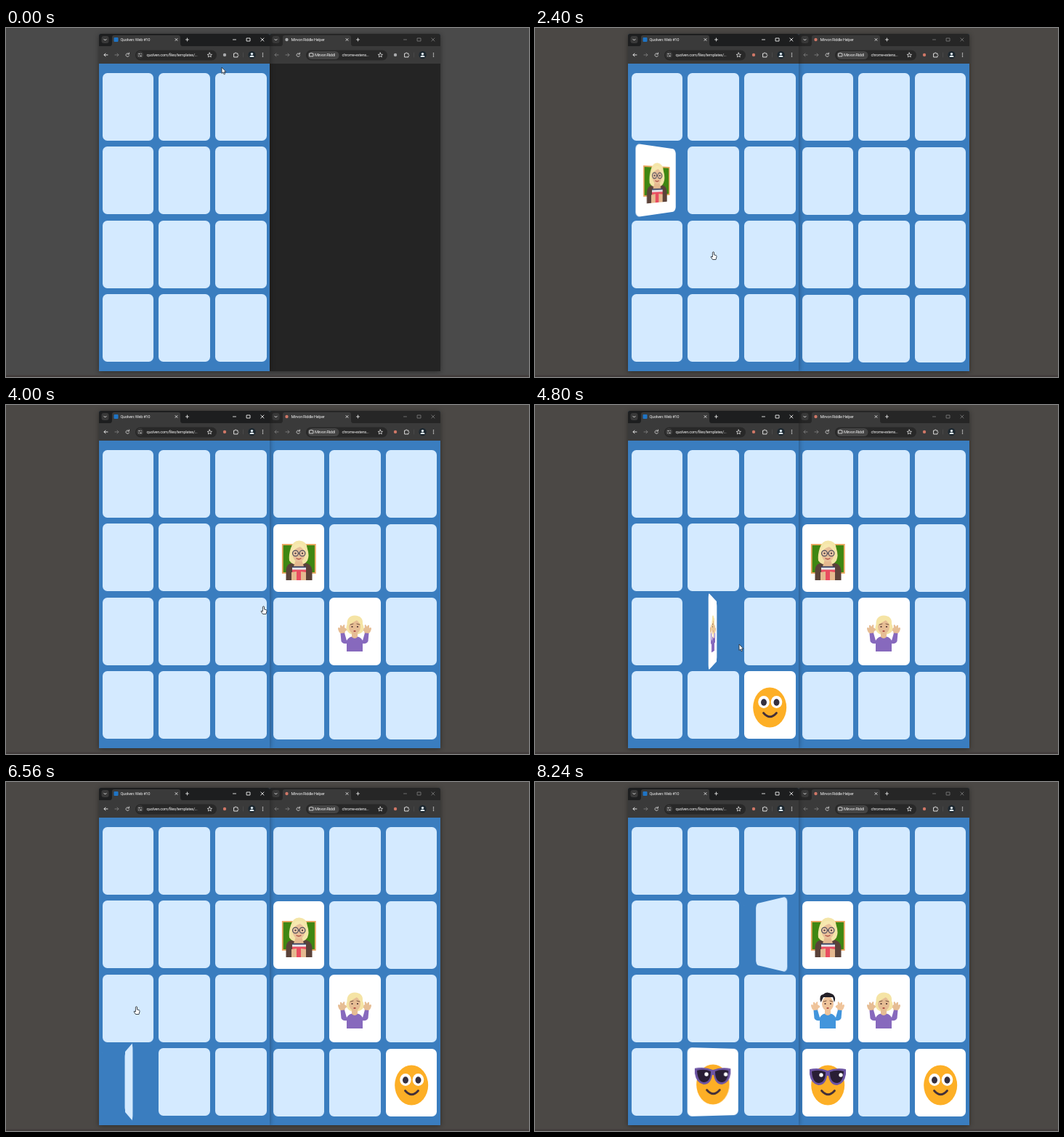
Write an HTML page that moves like this. It is 720 by 480 pixels and loops after 8.32 s.

```html
<!DOCTYPE html>
<html lang="en">
<head>
<meta charset="utf-8">
<title>Memory board helper</title>
<style>
  html, body { margin: 0; width: 100%; height: 100%; overflow: hidden; background: #4b4845; }
  #stage { position: relative; width: 720px; height: 480px; overflow: hidden; }
  svg { position: absolute; left: 0; top: 0; overflow: visible; }
  .window { position: absolute; top: 8px; width: 235px; height: 464px; border-radius: 3px 3px 1px 1px; background: #2d4a66; box-shadow: 0 1px 7px #0006; }
  .board { position: absolute; left: 0; top: 41px; width: 100%; height: 422.5px; background: #3a7dbf; }
  .empty .board { background: #242424; }
  .empty .card { display: none; }
  .card { position: absolute; width: 70.5px; height: 93px; border-radius: 6.5px; background: #d4eaff; }
  .card svg { display: none; }
  .card.open { background: #fff; }
  .card.open svg { display: block; }
  .small { font: 5.8px Roboto, sans-serif; letter-spacing: -.38px; fill: #e8e8e8; }
  #caption { font: 500 39px "Noto Sans CJK SC", "Noto Sans CJK JP", "Noto Sans CJK", sans-serif; letter-spacing: 1px; word-spacing: 8px; text-anchor: middle; fill: #fff; stroke: #3b434e; stroke-width: 4.5; stroke-linejoin: round; paint-order: stroke; }
</style>
</head>
<body>
<div id="stage"></div>
<script>
const LOOP = 8320, STEP = 80, FLIP = 500;
const stage = document.getElementById('stage');

// Stretches during which the picture stands still.
const holds = [[0, 720], [720, 960], [960, 1200], [1200, 1520], [2000, 2160], [3040, 3520], [5680, 5920], [7600, 7760]];

// Left board: card index, face, time of opening, time of closing.
const flips = [
  [3, 'teacher', 2160, 3500], [7, 'woman', 2400, 3500],
  [11, 'smile', 4280, 5900], [7, 'woman', 4640, 5900],
  [9, 'shades', 6425, 7740], [6, 'man', 6680, 7740],
  [10, 'shades', 7880, LOOP], [5, 'woman', 8140, LOOP]
];

// Right board: card index, face, time it is recorded.
const records = [[3, 'teacher', 3520], [7, 'woman', 3520], [11, 'smile', 5920], [9, 'shades', 7760], [6, 'man', 7760]];

const captions = [['ALT + Q', 720, 1600], ['ALT + W', 2960, 3600], ['ALT + W', 5280, 6000], ['ALT + W', 7280, 7840]];

// Pointer path: time, x, y of the tip.
const path = [
  [0, 297, 54], [1200, 297, 54], [1520, 292, 63], [2000, 168, 205], [2160, 168, 205], [2400, 245, 308],
  [3040, 372, 211], [3520, 372, 211], [4000, 354, 277], [4260, 325, 395], [4640, 248, 312],
  [5280, 380, 380], [5920, 380, 380], [6400, 166, 410], [6560, 179, 309], [6720, 179, 309],
  [7600, 290, 350], [7760, 290, 350], [7880, 246, 400], [8140, 312, 215], [LOOP, 312, 215]
];

const circle = (x, y, r, fill, more = '') => `<circle cx="${x}" cy="${y}" r="${r}" fill="${fill}" ${more}/>`;
const oval = (x, y, rx, ry, fill) => `<ellipse cx="${x}" cy="${y}" rx="${rx}" ry="${ry}" fill="${fill}"/>`;
const box = (x, y, w, h, fill, r = 0, more = '') => `<rect x="${x}" y="${y}" width="${w}" height="${h}" rx="${r}" fill="${fill}" ${more}/>`;
const shape = (d, fill) => `<path d="${d}" fill="${fill}"/>`;
const line = (d, color, w = 1) => `<path d="${d}" fill="none" stroke="${color}" stroke-width="${w}" stroke-linecap="round" stroke-linejoin="round"/>`;
const label = (x, y, text) => `<text class="small" x="${x}" y="${y}">${text}</text>`;

function shrug(shirt, hair, skin, long) {
  const hand = shape('M17 50Q12 47 12 42Q13 40 15 42L15 38Q17 37 18 40L20 37Q22 37 21 41L24 43Q25 45 22 46L21 50Z', skin);
  return hand + `<g transform="translate(70) scale(-1 1)">${hand}</g>` +
    (long ? shape('M25 46Q22 42 24.500 37Q24 25 35 24.500Q47 25 46 36Q49 42 46 47Q41 51 35 51Q28 51 25 46Z', hair) : '') +
    shape('M15.500 49L21 48.500L24 59Q27 53 35 53Q43 53 46 59L49 48.500L54.500 49L53.500 60Q51 64 46 63V74H24V63Q19 64 16.500 60Z', shirt) +
    shape('M31 47H39V54Q35 58 31 54Z', skin) + oval(35, 40, 8, 10, skin) +
    (long ? shape('M26 39Q24 25 35 25Q45 25 45 39Q42 35 38 31Q32 34 26 39Z', hair)
          : shape('M25.500 38Q22 28 29 27Q33 22 42 27Q47 31 44 38L42 31H29Z', hair)) +
    line('M29 37L33 36M38 36L42 37', '#6b4a38', .9) +
    circle(31.500, 40, 1.1, '#4a3030') + circle(39, 40, 1.1, '#4a3030') + oval(35, 46, 1.700, 1.1, '#a9473f');
}

const ball = oval(35.2, 50, 23, 27.500, '#fdaf26') + line('M26.500 57.500Q35.500 68 44.500 57.500', '#433039', 2.800);

const faces = {
  teacher:
    box(12.800, 28, 45, 39, '#3f8712', 0, 'stroke="#eaa55c" stroke-width="1.8"') +
    shape('M17.500 77V63Q18 54 27 53H43Q52 54 53.500 63V77Z', '#5b4239') +
    shape('M22 50Q21 42 24 33Q27 22 36 22.500Q46 23 47 34Q50 43 47 50Q43 56 35 56Q26 56 22 50Z', '#f4e5a8') +
    shape('M31 49H39L42 58L35 62L28 58Z', '#e5b98f') + oval(35, 41, 8.500, 11, '#e9c099') +
    shape('M25 40Q27 26 35 27Q43 26 45 40Q42 34 37 31Q30 33 25 40Z', '#f7e8b0') +
    [30.500, 40].map(x => circle(x, 40, 1.2, '#3f2b2b') + circle(x, 40, 3.900, '#fff2', 'stroke="#53505c" stroke-width="1.3"')).join('') +
    line('M34.500 40H36', '#53505c') + line('M32 47Q35 49 38 47', '#a9473f', 1.3) +
    box(26, 59, 19, 4, '#e7e9ed') + box(26, 57.800, 19, 1.800, '#37405f') + box(26, 62.500, 19, 14.500, '#e94d60') +
    shape('M25 66L32 65V77H25ZM38 65L45 66V77H38Z', '#e5b98f'),
  woman: shrug('#8769bd', '#f5e4a5', '#e6bd94', true),
  man: shrug('#4295dc', '#252128', '#efc49b', false),
  smile: ball + [27, 44.500].map(x => oval(x, 42.500, 7.800, 8.500, '#fff') + oval(x, 43, 4, 4.700, '#35303f')).join(''),
  shades: ball +
    shape('M10 28Q23 25 35 30Q47 25 60 28V35Q58 48 48 50Q38 50 36 37H34Q32 50 22 50Q12 48 10 35Z', '#6d55a3') +
    shape('M13 31Q23 28 32 32Q32 47 22 47Q14 46 13 31ZM57 31Q47 28 38 32Q38 47 48 47Q56 46 57 31Z', '#291e35') +
    [26, 53].map(x => circle(x, 36, 2.700, '#fff')).join('')
};

function chrome(active, title, address) {
  const dim = active ? '#f0f0f0' : '#777', soft = '#bdbdbd';
  return `<svg width="235" height="41">` +
    box(0, 0, 235, 41, active ? '#1d1e1f' : '#262626', 3) +
    box(0, 17, 235, 24, '#3a3a3a') + shape('M15 17Q18 17 18 13V5Q18 2 21 2H109Q112 2 112 5V13Q112 17 115 17Z', '#3a3a3a') +
    box(3.500, 3, 10, 10, '#393939', 3) + line('M7 7.500L8.500 9L10 7.500', '#ddd') +
    (active ? box(20.500, 5, 6, 6, '#1f74c4', 1) : circle(23.500, 8, 2.200, '#aaa', 'class="mark"')) +
    label(29.500, 10.300, title) +
    line('M105 6.500L108 9.500M108 6.500L105 9.500M119.500 8H123.500M121.500 6V10', '#e0e0e0', .9) +
    line('M184.500 8H188.500M203.500 6H208V10H203.500ZM222.800 6L227 10M227 6L222.800 10', dim, .9) +
    line('M12 29H7M9 27L7 29L9 31', active ? '#ddd' : '#777') + line('M22 29H27M25 27L27 29L25 31', '#777') +
    line('M41 27.500A2.300 2.300 0 1 0 41.500 30M41.500 26V28H39.500', soft) +
    box(50, 22.500, 112, 14, '#282828', 7) +
    (active
      ? circle(56.500, 29, 4.700, '#3c3c3c') + line('M54.500 27.700H56.500M58.300 27.700H58.500M54.500 30.500H54.700M56.500 30.500H58.500', '#ddd', .9) + label(65.500, 31.200, address)
      : box(52.500, 24, 43, 11, '#444', 5.500) + line('M55 27H56.500Q57 25 58 27H60V31H55Z', '#ddd', .9) + label(62, 31.200, title.slice(0, 12)) + label(99.500, 31.200, address)) +
    line('M152.300 26L153.200 28.200L155.500 28.400L153.700 29.900L154.300 32L152.300 30.800L150.300 32L150.900 29.900L149.100 28.400L151.400 28.200Z', '#ddd', .8) +
    circle(173, 29, 2.200, '#aaa', 'class="mark"') +
    line('M186 27H187.300Q188.300 24.500 189.300 27H191V28.500Q193 29.500 191 30.500V32H186Z', '#ddd') + line('M198.500 26V32', '#555', .6) +
    circle(210.500, 29, 5.200, '#1d2830') + circle(210.500, 27.600, 1.700, '#e4f0f8') + shape('M207.500 32Q207.500 29.800 210.500 29.800Q213.500 29.800 213.500 32Z', '#e4f0f8') +
    [26.700, 29, 31.300].map(y => circle(225.500, y, .75, '#ddd')).join('') + '</svg>';
}

function makeWindow(left, active, title, address) {
  const win = document.createElement('div');
  win.className = 'window';
  win.style.left = left + 'px';
  win.innerHTML = chrome(active, title, address) + '<div class="board"></div>';
  const board = win.lastChild;
  const cards = Array.from({ length: 12 }, (_, i) => {
    const card = document.createElement('div');
    card.className = 'card';
    card.style.left = 4.700 + i % 3 * 77.600 + 'px';
    card.style.top = 12.600 + Math.floor(i / 3) * 101.500 + (active ? 0 : .4) + 'px';
    board.append(card);
    return card;
  });
  stage.append(win);
  return { win, cards };
}

const right = makeWindow(363, false, 'Mirvon Riddle Helper', 'chrome-extens...');
const left = makeWindow(128.2, true, 'Quolven: Web #10', 'quolven.com/files/templates/...');
const marks = document.querySelectorAll('.mark');

stage.insertAdjacentHTML('beforeend', `<svg width="720" height="480">
  ${box(0, 477.5, 720, 2.5, '#423d3c')}
  <g id="pointer" stroke="#29323c" stroke-width=".9" stroke-linejoin="round" fill="#fff">
    <path id="arrow" d="M0 0V8.500L1.900 6.800L3.200 9.800L4.600 9.200L3.300 6.300H5.800Z"/>
    <path id="hand" d="M0 0Q1.300 -.6 1.500 .8V4L4.300 4.700Q5.300 5 5 6.700L4 10.500H-.5L-3 6.800Q-2.500 5.500 -.6 7V.7Z"/>
  </g>
  <text id="caption" x="360.5" y="404"></text></svg>`);
const [pointer, arrow, hand, caption] = ['pointer', 'arrow', 'hand', 'caption'].map(id => document.getElementById(id));

const clamp = v => Math.min(1, Math.max(0, v));

// cubic-bezier(.25, .1, .25, 1)
function ease(x) {
  const curve = (u, a, b) => 3 * u * (1 - u) ** 2 * a + 3 * u * u * (1 - u) * b + u ** 3;
  let lo = 0, hi = 1;
  for (let i = 0; i < 16; i++) {
    const mid = (lo + hi) / 2;
    if (curve(mid, .25, .25) < x) lo = mid; else hi = mid;
  }
  return x <= 0 ? 0 : x >= 1 ? 1 : curve(lo, .1, 1);
}

function showCard(card, face, turn) {
  const open = turn > .5;
  card.classList.toggle('open', open);
  if (open && card.dataset.face !== face) {
    card.dataset.face = face;
    card.innerHTML = `<svg width="70" height="93">${faces[face]}</svg>`;
  }
  const angle = (open ? 180 : 0) - turn * 180;
  card.style.transform = turn % 1 ? `perspective(265px) rotateY(${angle}deg)` : '';
  card.style.zIndex = turn % 1 ? 1 : 0;
}

function pointerAt(t) {
  const i = path.findIndex(p => p[0] > t);
  const [a, b] = [path[i - 1], path[i]];
  const u = (t - a[0]) / (b[0] - a[0]);
  return [a[1] + (b[1] - a[1]) * u, a[2] + (b[2] - a[2]) * u];
}

function render(time) {
  let t = Math.floor(time / STEP) * STEP;
  const hold = holds.find(([from, to]) => t >= from && t < to);
  if (hold) t = hold[0];

  const turns = Array(12).fill(0);
  const shown = Array(12).fill('');
  for (const [card, face, from, to] of flips) {
    if (t < from || t > to + FLIP) continue;
    turns[card] = t < to ? ease((t - from) / FLIP) : 1 - ease(clamp((t - to) / FLIP));
    shown[card] = face;
  }
  left.cards.forEach((card, i) => showCard(card, shown[i], turns[i]));

  right.win.classList.toggle('empty', t < 960);
  right.cards.forEach((card, i) => {
    const record = records.find(r => r[0] === i && t >= r[2]);
    showCard(card, record ? record[1] : '', record ? 1 : 0);
  });

  const [x, y] = pointerAt(t);
  const col = Math.floor((x - 133) / 77.6), row = Math.floor((y - 62) / 101.5);
  const dx = x - 133 - col * 77.6, dy = y - 62 - row * 101.5;
  const over = col >= 0 && col < 3 && row >= 0 && row < 4 && dx > 3 && dx < 67.5 && dy > 3 && dy < 90;
  const clickable = over && turns[row * 3 + col] === 0;
  pointer.setAttribute('transform', `translate(${x} ${y})`);
  pointer.style.display = t >= 5280 && t < 5920 ? 'none' : '';
  arrow.style.display = clickable ? 'none' : '';
  hand.style.display = clickable ? '' : 'none';

  const current = captions.find(([, from, to]) => t >= from && t < to);
  caption.textContent = current ? current[0] : '';

  stage.style.background = t < 720 ? '#4a4a4a' : '#4b4845';
  marks.forEach(mark => mark.setAttribute('fill', t < 2160 ? '#a9abad' : '#cf7767'));
}

const start = performance.now();
function frame() {
  render((performance.now() - start) % LOOP);
  requestAnimationFrame(frame);
}
frame();
</script>
</body>
</html>
```
